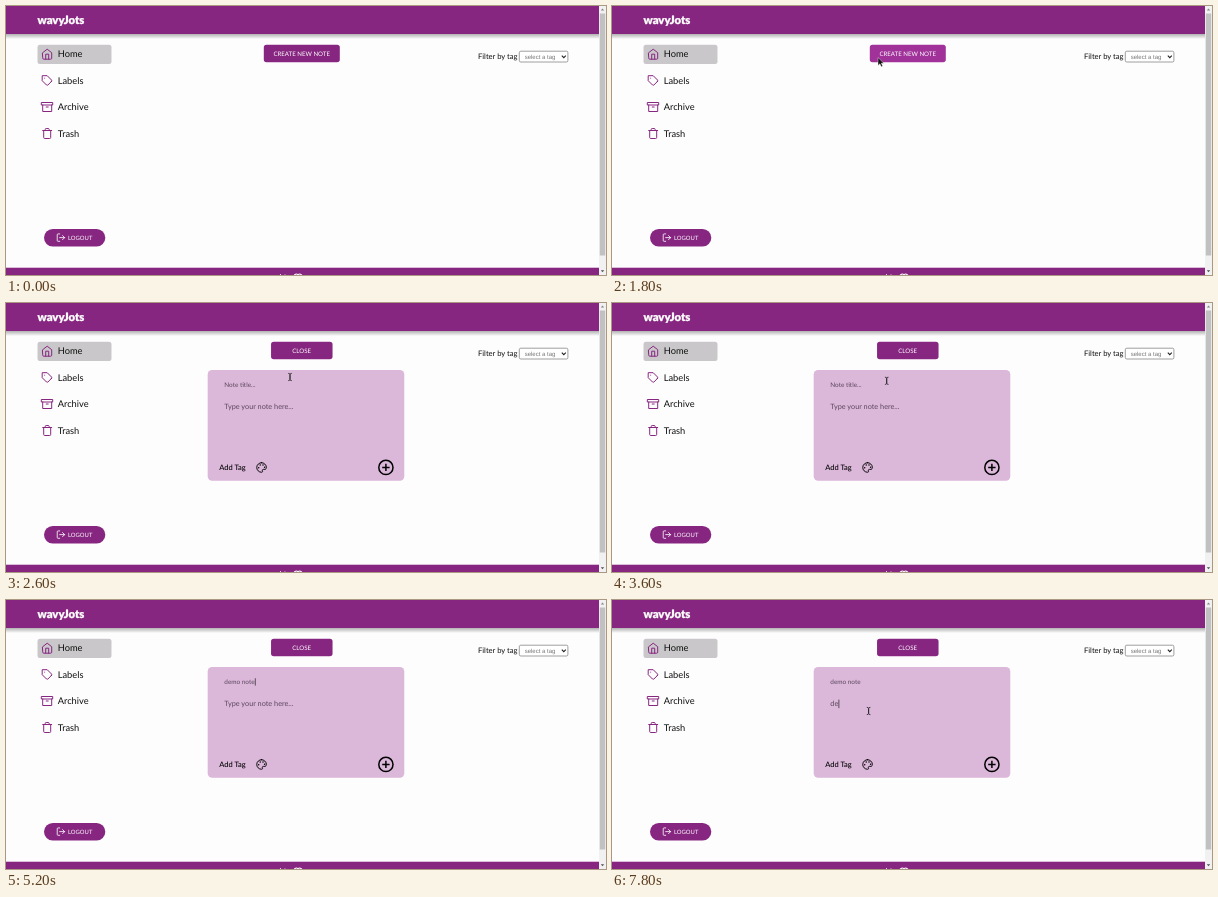
An HTML page that plays this animation: 600x269 px, repeating every 8 s.

```html
<!DOCTYPE html>
<html lang="en">
<head>
<meta charset="utf-8">
<title>Notes app</title>
<style>
  html, body { margin: 0; width: 100%; height: 100%; overflow: hidden; background: #fefdfe; }
  svg { display: block; width: 600px; height: 269px; }
  text { font-family: Lato, sans-serif; white-space: pre; text-rendering: geometricPrecision; }
  .brand { font: 900 11.3px Lato, sans-serif; fill: #fff; stroke: #fff; stroke-width: .3; stroke-linejoin: round; }
  .nav { font-size: 9.3px; fill: #111; }
  .caps { font-size: 6.15px; fill: #fff; }
  .mid { text-anchor: middle; }
  .purple { fill: #872681; }
  .icon { fill: none; stroke: #872681; stroke-width: 2; stroke-linecap: round; stroke-linejoin: round; }
  .white { stroke: #fff; }
  .black { stroke: #000; }
  .field { fill: #5c485d; }
</style>
</head>
<body>
<svg viewBox="0 0 600 269">
  <defs>
    <linearGradient id="shade" x2="0" y2="1">
      <stop stop-color="#000" stop-opacity=".3"/>
      <stop offset="1" stop-color="#000" stop-opacity="0"/>
    </linearGradient>
  </defs>
  <rect width="600" height="269" fill="#fefdfe"/>

  <rect y="28" width="593" height="5" fill="url(#shade)"/>
  <rect class="purple" width="593" height="28"/>
  <text class="brand" x="31.5" y="18">wavyJots</text>

  <rect x="31.5" y="38.7" width="74" height="19.3" rx="2.5" fill="#c9c7c9"/>
  <path class="icon" transform="translate(35.2 42.2) scale(.5)" d="M3 9l9-7 9 7v11a2 2 0 0 1-2 2H5a2 2 0 0 1-2-2zM9 22V12h6v10"/>
  <path class="icon" transform="translate(35.2 68.7) scale(.5)" d="M20.6 13.4l-7.2 7.2a2 2 0 0 1-2.8 0L2 12V2h10l8.6 8.6a2 2 0 0 1 0 2.8zM7 7h.01"/>
  <path class="icon" transform="translate(35.2 95) scale(.5)" d="M21 8v13H3V8M1 3h22v5H1zM10 12h4"/>
  <path class="icon" transform="translate(35.2 121.5) scale(.5)" d="M3 6h18M19 6v14a2 2 0 0 1-2 2H7a2 2 0 0 1-2-2V6M8 6V4a2 2 0 0 1 2-2h4a2 2 0 0 1 2 2v2"/>
  <text class="nav" x="51.7" y="51.4">Home</text>
  <text class="nav" x="51.7" y="77.8">Labels</text>
  <text class="nav" x="51.7" y="104.2">Archive</text>
  <text class="nav" x="51.7" y="130.6">Trash</text>

  <rect class="purple" x="38" y="223" width="61.3" height="17.5" rx="8.75"/>
  <path class="icon white" transform="translate(50 226.7) scale(.41)" d="M9 21H5a2 2 0 0 1-2-2V5a2 2 0 0 1 2-2h4M16 17l5-5-5-5M21 12H9"/>
  <text class="caps" x="62" y="233.9" style="font-size:5.9px">LOGOUT</text>

  <text x="472" y="53" font-size="7.6" fill="#111">Filter by tag</text>
  <rect x="513.3" y="45.2" width="48.6" height="10.8" rx="1.5" fill="#fff" stroke="#767676" stroke-width=".7"/>
  <text x="518.7" y="52.8" style="font:6px 'Liberation Sans',sans-serif" fill="#777">select a tag</text>
  <path d="M555.8 49.6l2 2 2-2" fill="none" stroke="#222" stroke-width="1.1"/>

  <rect id="button" y="38.7" height="17.6" rx="2.7"/>
  <text id="label" class="caps mid" x="295.7" y="49.8"></text>

  <g id="card">
    <rect x="201.7" y="67" width="196.6" height="110.8" rx="4.5" fill="#dbb7d9"/>
    <text id="title" class="field" x="218.3" y="84" font-size="6.4"></text>
    <text id="body" class="field" x="218.3" y="106.4" font-size="7.3"></text>
    <text x="213.3" y="167.2" font-size="7.5" font-weight="500">Add Tag</text>
    <path class="icon black" transform="translate(249.8 158.7) scale(.48)" stroke-width="2.3" d="M12 2a10 10 0 0 0 0 20c2 0 2.6-1.5 1.8-3s.2-3 2-3H19c2 0 3-2 3-4a10 10 0 0 0-10-10z"/>
    <path d="M252.7 164.7h.01M254.2 162.1h.01M257 162.1h.01M258.6 164.3h.01" stroke="#000" stroke-width="1.5" stroke-linecap="round"/>
    <path d="M372.8 164.4a7.1 7.1 0 0 1 14.2 0a7.1 7.1 0 0 1-14.2 0M376.2 164.4h7.4M379.9 160.7v7.4" fill="none" stroke="#000" stroke-width="1.5"/>
    <rect id="caret" width=".7" fill="#222"/>
  </g>

  <rect class="purple" y="261.7" width="593" height="8"/>
  <path d="M274.5 268v1M279 268.4v1" stroke="#fff" stroke-width=".8"/>
  <path d="M292 276l-3.7-4.2a2.4 2.4 0 0 1 3.7-3a2.4 2.4 0 0 1 3.7 3z" fill="none" stroke="#fff" stroke-width="1.1"/>

  <rect x="593" width="7" height="269" fill="#f1f1f1"/>
  <rect x="593.8" y="7.5" width="5.4" height="242" fill="#c1c1c1"/>
  <path d="M594.8 4.6l1.7-2 1.7 2z" fill="#888"/>
  <path d="M594.8 264.2l1.7 2 1.7-2z" fill="#505050"/>

  <path id="pointer" stroke-linejoin="round"/>
</svg>
<script>
  const $ = id => document.getElementById(id);
  const set = (el, attrs) => { for (const k in attrs) el.setAttribute(k, attrs[k]); };

  const LOOP = 8000, LEFT = 218.3;
  const pointers = {
    arrow: { d: 'M0 0v8l1.9-1.7 1.4 3 1.4-.7-1.4-2.9h2.5z', fill: '#111', stroke: '#fff', 'stroke-width': .4 },
    hand: { d: 'M-1 4v-6.8q.8-1 1.6 0v3l3 .8v3.4l-1 2h-4l-2.6-4q.8-1 2 .4z', fill: '#fff', stroke: '#222', 'stroke-width': .7 },
    beam: { d: 'M-1.8-3.6q1.8 0 1.8 1v5.2q0 1-1.8 1M1.8-3.6q-1.8 0-1.8 1v5.2q0 1 1.8 1', fill: 'none', stroke: '#222', 'stroke-width': .8 }
  };

  // Each step changes only the listed properties.
  const start = { at: 0, open: false, hover: false, pointer: null, title: '', body: '', caret: null };
  const steps = [
    { at: 1200, pointer: ['arrow', 254, 74] },
    { at: 1800, hover: true, pointer: ['arrow', 266, 51.5] },
    { at: 2400, open: true, pointer: ['hand', 296, 47.5] },
    { at: 2600, hover: false, pointer: ['beam', 284, 74] },
    { at: 3000, pointer: ['beam', 278, 77] },
    { at: 3600, pointer: ['beam', 274.7, 77.8] },
    { at: 4000, caret: 'title' },
    { at: 4200, pointer: null, title: 'd' },
    { at: 4400, title: 'de' },
    { at: 4600, title: 'demo' },
    { at: 4800, title: 'demo n' },
    { at: 5000, title: 'demo not' },
    { at: 5200, title: 'demo note' },
    { at: 5800, caret: null },
    { at: 6400, caret: 'title', pointer: ['beam', 270.5, 88] },
    { at: 6600, pointer: ['beam', 257, 108] },
    { at: 7200, caret: 'body', pointer: ['beam', 256.6, 111] },
    { at: 7600, body: 'd' },
    { at: 7800, body: 'de' }
  ];

  function stateAt(time) {
    return Object.assign({}, start, ...steps.filter(s => s.at <= time));
  }

  function drawCaret(field, text) {
    const el = $(field), big = field === 'body';
    set($('caret'), {
      x: LEFT + (text ? el.getComputedTextLength() + .3 : 0),
      y: big ? 99.6 : 78.2,
      height: big ? 8.5 : 7.4
    });
  }

  function draw(s) {
    const width = s.open ? 61.5 : 76;
    set($('button'), { x: 295.8 - width / 2, width, fill: s.hover ? '#a0329a' : '#872681' });
    $('label').textContent = s.open ? 'CLOSE' : 'CREATE NEW NOTE';
    $('card').style.display = s.open ? '' : 'none';
    $('title').textContent = s.title || 'Note title...';
    $('body').textContent = s.body || 'Type your note here...';
    $('caret').style.display = s.caret ? '' : 'none';
    if (s.caret) drawCaret(s.caret, s[s.caret]);
    $('pointer').style.display = s.pointer ? '' : 'none';
    if (s.pointer) {
      const [kind, x, y] = s.pointer;
      set($('pointer'), { ...pointers[kind], transform: `translate(${x} ${y})` });
    }
  }

  let shown = -1;
  function tick() {
    const s = stateAt(performance.now() % LOOP);
    if (s.at !== shown) draw(s);
    shown = s.at;
    requestAnimationFrame(tick);
  }
  tick();
</script>
</body>
</html>
```
